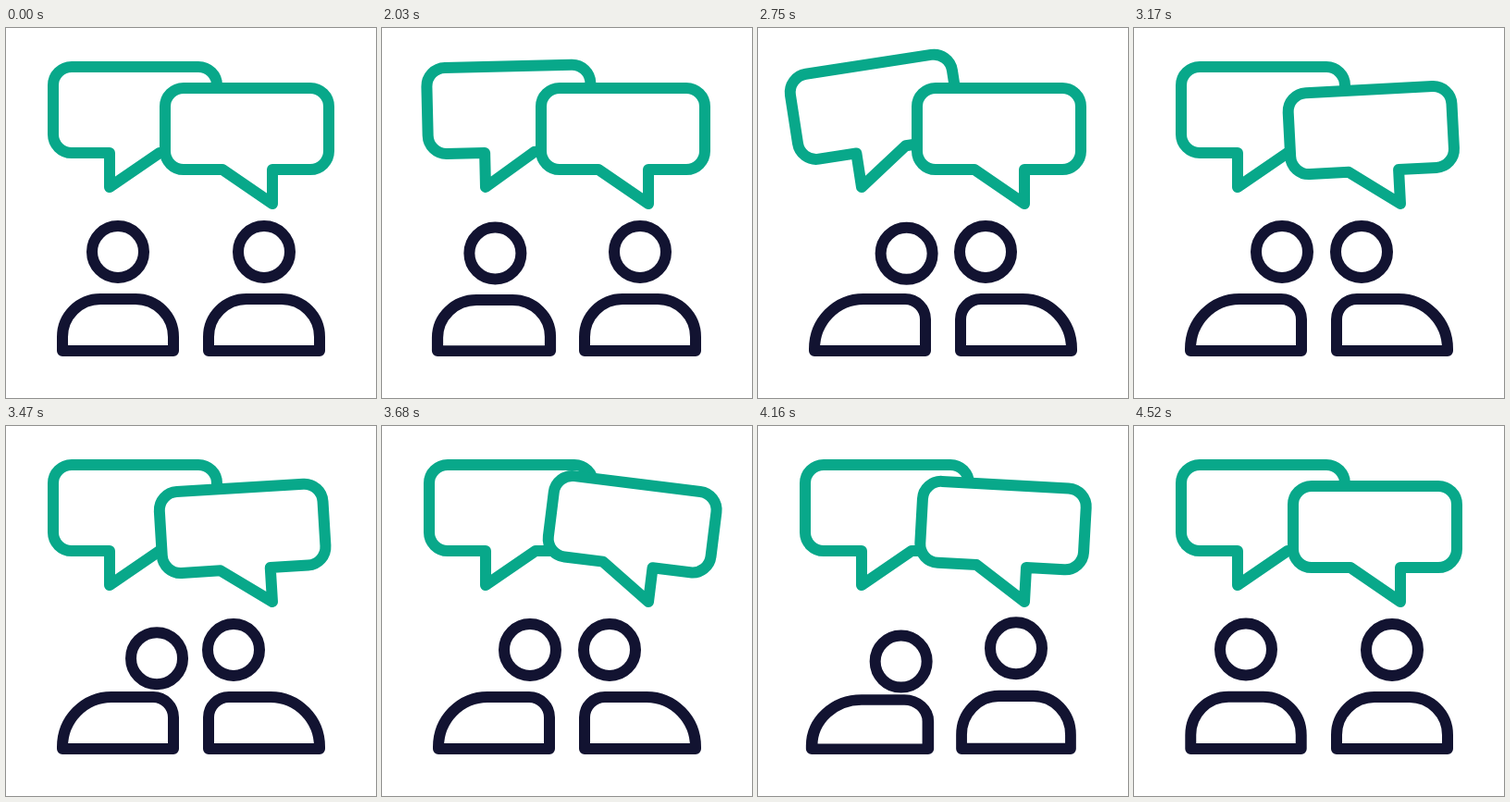
These frames come from a looping animation (400x400 px, 4550 ms). An HTML page:

```html
<!DOCTYPE html>
<html lang="en">
<head>
<meta charset="utf-8">
<title>Conversation</title>
<style>
  html, body { margin: 0; height: 100%; overflow: hidden; background: #fff; }
  svg { display: block; width: 100vw; height: 100vh; }
  path, circle { fill: none; stroke-width: 12; stroke-linejoin: round; }
  .bubble { stroke: #08a88a; fill: #fff; }
  .person { stroke: #121331; }
</style>
</head>
<body>
<svg viewBox="0 0 400 400">
  <path id="bubbleL" class="bubble" d="M112 172V135H71A20 20 0 0 1 51 115V62A20 20 0 0 1 71 42H208A20 20 0 0 1 228 62V115A20 20 0 0 1 208 135H166Z"/>
  <path id="bubbleR" class="bubble" d="M288 190V153H329A20 20 0 0 0 349 133V85A20 20 0 0 0 329 65H192A20 20 0 0 0 172 85V133A20 20 0 0 0 192 153H234Z"/>
  <g class="person">
    <path id="bodyL"/><circle id="headL" r="28"/>
    <path id="bodyR"/><circle id="headR" r="28"/>
  </g>
</svg>
<script>
  const LOOP = 4550, TURN = 290;
  const SWAY = [[0, 0], [244, -21], [480, 15], [716, -10], [952, 5], [1188, 0]];
  const $ = id => document.getElementById(id);
  const clamp = u => Math.min(1, Math.max(0, u));
  const ease = u => (1 - Math.cos(Math.PI * clamp(u))) / 2;
  const mix = (a, b, u) => a + (b - a) * u;

  // Decaying swing of a bubble, in degrees.
  function sway(d) {
    let angle = 0;
    for (let i = 1; i < SWAY.length; i++) {
      const [t0, a0] = SWAY[i - 1], [t1, a1] = SWAY[i];
      angle += (a1 - a0) * ease((d - t0) / (t1 - t0));
    }
    return angle;
  }

  // Squash, then a slight stretch.
  function squash(d) {
    if (d < 0 || d > 450) return 0;
    if (d < 200) return Math.sin(Math.PI * d / 200) ** 2;
    return -0.3 * Math.sin(Math.PI * (d - 200) / 250);
  }

  // Two nods of the listening head.
  function nod(t) {
    const u = (t - 2685) / 480;
    return u < 0 || u > 2 ? 0 : 5.5 * (1 - Math.cos(2 * Math.PI * u));
  }

  function drawPerson(side, t, { x, dir, shift, start, end, dip = 0 }) {
    const turn = ease((t - start) / TURN) - ease((t - end) / TURN);
    const q = squash(t - start) + squash(t - end);
    const outer = mix(41, 53, turn), rise = mix(41, 54, turn), inner = mix(41, 22, turn);
    const sweep = dir > 0 ? 1 : 0;
    const px = v => x + dir * v;

    $('body' + side).setAttribute('d',
      `M${px(-60)} 349V${293 + rise}A${outer} ${rise} 0 0 ${sweep} ${px(outer - 60)} 293` +
      `H${px(60 - inner)}A${inner} ${inner} 0 0 ${sweep} ${px(60)} ${293 + inner}V349Z`);
    $('body' + side).setAttribute('transform',
      `translate(${x} 355) scale(${1 + 0.06 * q} ${1 - 0.06 * q}) translate(${-x} -355)`);

    const drop = q > 0 ? 20 * q * q : 6 * q;
    $('head' + side).setAttribute('cx', x + dir * (shift * turn + dip / 3));
    $('head' + side).setAttribute('cy', 242 + drop + dip);
  }

  function draw(t) {
    $('bubbleL').setAttribute('transform', `rotate(${sway(t - 1990)} 112 172)`);
    $('bubbleR').setAttribute('transform', `rotate(${sway(t - 3110)} 288 190)`);
    drawPerson('L', t, { x: 121, dir: 1, shift: 39, start: 1995, end: 4090, dip: nod(t) });
    drawPerson('R', t, { x: 279, dir: -1, shift: 33, start: 2086, end: 3855 });
  }

  let origin;
  function tick(now) {
    origin ??= now;
    draw((now - origin) % LOOP);
    requestAnimationFrame(tick);
  }
  draw(0);
  requestAnimationFrame(tick);
</script>
</body>
</html>
```
